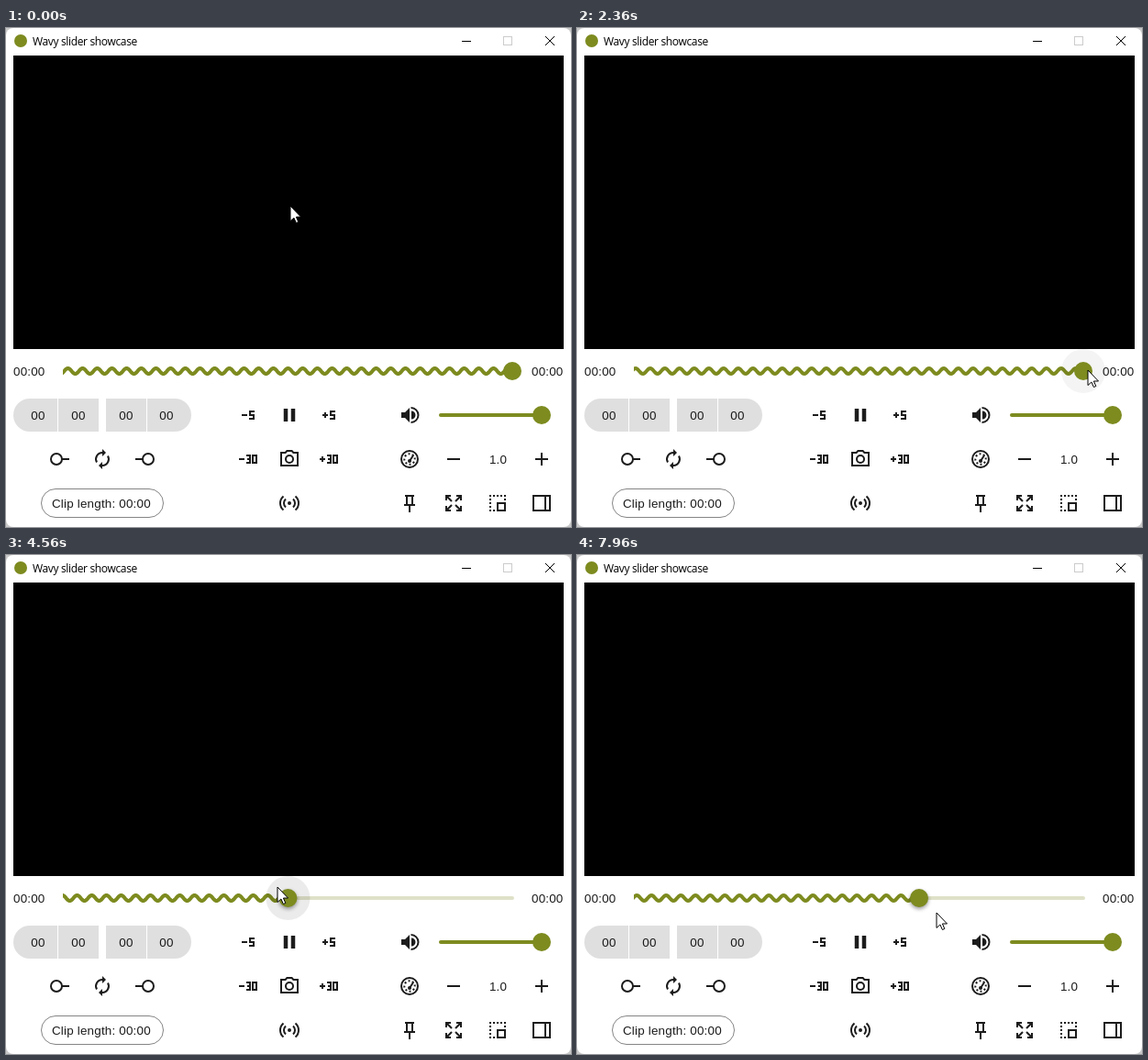
These frames come from a looping animation (616 px wide and 544 px high, 8 s). An HTML page:

```html
<!DOCTYPE html>
<html lang="en">
<head>
<meta charset="utf-8">
<title>Wavy slider showcase</title>
<style>
  html, body { margin: 0; width: 100%; height: 100%; overflow: hidden; background: #c9c9c9; }
  svg { display: block; width: 616px; height: 544px; }
  text { font: 13.4px "Liberation Sans", Arial, sans-serif; letter-spacing: .2px; fill: #1c1c1c; }
  .title { font: 12px "Open Sans", "Noto Sans", sans-serif; letter-spacing: -.35px; fill: #000; }
  .mid { text-anchor: middle; }
  .line { fill: none; stroke: #1c1c1c; stroke-width: 2; }
  .solid { fill: #1c1c1c; stroke: none; }
  .olive { fill: #7d8b1f; }
  .track { fill: none; stroke: #7d8b1f; stroke-width: 4; stroke-linecap: round; }
</style>
</head>
<body>
<svg viewBox="0 0 616 544">
  <defs>
    <clipPath id="active"><rect id="activeRect" x="62" y="360" height="28"/></clipPath>
    <filter id="blur" x="-50%" y="-50%" width="200%" height="200%"><feGaussianBlur stdDeviation="2"/></filter>
    <path id="minus" d="M0 5H6"/>
    <path id="plus" d="M0 5H6M3 2V8"/>
    <path id="three" d="M0 1H4V9H0M1 5H4"/>
    <path id="five" d="M6 1H1V5H5V9H0"/>
    <path id="zero" d="M1 1H5V9H1Z"/>
    <g id="turn"><path d="M0 -7A7 7 0 0 0 -6 3.5"/><path class="solid" d="M0 -11L4 -7L0 -3Z"/></g>
    <path id="corner" d="M-8 -3V-8H-3M-8 -8L-2 -2"/>
    <path id="waves" d="M-6.5 -7.6A10 10 0 0 0 -6.5 7.6M-4 -4.5A6 6 0 0 0 -4 4.5"/>
  </defs>

  <rect width="616" height="544" rx="8" fill="#fff"/>
  <rect x="8" y="30" width="600" height="320"/>

  <!-- title bar -->
  <circle class="olive" cx="16" cy="14" r="7"/>
  <text class="title" x="29" y="19">Wavy slider showcase</text>
  <g fill="none" stroke="#000">
    <path d="M497 14.5H507"/>
    <rect x="542.5" y="9.5" width="9" height="9" stroke="#ccc"/>
    <path d="M588 9L598 19M598 9L588 19"/>
  </g>

  <!-- seek bar -->
  <text x="8" y="379">00:00</text>
  <text x="573" y="379">00:00</text>
  <path id="rest" class="track" style="stroke:#dfe1c8"/>
  <g clip-path="url(#active)"><path id="wave" class="track"/></g>
  <circle id="halo" cy="374" r="24"/>
  <circle id="shadow" cy="376" r="10" filter="url(#blur)" opacity=".4"/>
  <circle id="thumb" class="olive" cy="374" r="10"/>

  <!-- clip times -->
  <g fill="#dfdfdf">
    <path d="M56 404H26a18 18 0 0 0 0 36H56Z"/>
    <path d="M57 404H101V440H57ZM109 404H153V440H109Z"/>
    <path d="M154 404H184a18 18 0 0 1 0 36H154Z"/>
  </g>
  <g class="mid">
    <text x="35" y="427">00</text><text x="79" y="427">00</text>
    <text x="131" y="427">00</text><text x="175" y="427">00</text>
    <text x="536.5" y="475">1.0</text>
  </g>
  <rect x="38.5" y="502.5" width="133" height="31" rx="15.5" fill="none" stroke="#858585"/>
  <text x="50" y="523">Clip length: 00:00</text>

  <!-- skip buttons -->
  <g class="line">
    <use href="#minus" x="257" y="417"/><use href="#five" x="265" y="417"/>
    <use href="#plus" x="345" y="417"/><use href="#five" x="353" y="417"/>
    <use href="#minus" x="254" y="465"/><use href="#three" x="262" y="465"/><use href="#zero" x="268" y="465"/>
    <use href="#plus" x="342" y="465"/><use href="#three" x="350" y="465"/><use href="#zero" x="356" y="465"/>
  </g>

  <!-- volume -->
  <path class="track" d="M474 422H584"/>
  <circle class="olive" cx="584" cy="422" r="10"/>

  <!-- icons, each drawn around its own centre -->
  <g class="line">
    <g transform="translate(55 470)"><circle r="6"/><path d="M6 0H14"/></g>
    <g transform="translate(155 470)"><circle r="6"/><path d="M-6 0H-14"/></g>
    <g transform="translate(105 470)"><use href="#turn"/><use href="#turn" transform="rotate(180)"/></g>
    <path transform="translate(309 422)" stroke-width="4.5" d="M-4 -7V7M4 -7V7"/>
    <g transform="translate(309 470)">
      <path d="M-9 -7H-4.4L-2.6 -9H2.6L4.4 -7H9V7H-9Z"/><circle r="4"/>
    </g>
    <g transform="translate(309 518)">
      <circle class="solid" r="2"/><use href="#waves"/><use href="#waves" transform="scale(-1 1)"/>
    </g>
    <g transform="translate(440 422)">
      <path class="solid" d="M-9 -3H-5L0 -8V8L-5 3H-9ZM2 -4.5A4.5 4.5 0 0 1 2 4.5Z"/>
      <path d="M1.5 -8A8 8 0 0 1 1.5 8"/>
    </g>
    <g transform="translate(440 470)">
      <circle r="9"/>
      <circle r="5.7" pathLength="36" stroke-dasharray="2 2.5" stroke-dashoffset="-12"/>
      <circle class="solid" cy="2" r="2"/><path d="M0 2L4 -4"/>
    </g>
    <path transform="translate(488 470)" d="M-7 0H7"/>
    <path transform="translate(584 470)" d="M-7 0H7M0 -7V7"/>
    <path transform="translate(440 518)" d="M-5 -8H5M-3 -8V2M3 -8V2M-6 2H6M0 2V10"/>
    <g transform="translate(488 518)">
      <use href="#corner"/><use href="#corner" transform="rotate(90)"/>
      <use href="#corner" transform="rotate(180)"/><use href="#corner" transform="rotate(270)"/>
    </g>
    <g transform="translate(536 518)">
      <path d="M0 0H8V8H0Z"/>
      <path stroke-dasharray="2 2" d="M-9 -8H9M-8 -5V9M8 -5V-2M-5 8H-2"/>
    </g>
    <path transform="translate(584 518)" d="M-9 -8H9V8H-9ZM4 -8V8"/>
  </g>

  <path id="cursor" d="M1 1V17.5L4.9 14L7.4 19.5L9.8 18.5L7.4 13H12.5Z" fill="#fff" stroke="#000"/>
</svg>
<script>
const LOOP = 8000, FRAME = 40;
const WAVE_LENGTH = 16, WAVE_AMPLITUDE = 3, WAVE_SPEED = 25 / 3; // px, px, px per second
const FIRST_CREST = 67.5;
const MIN_X = 64, MAX_X = 552;
const GRAB = 2860, LAG = 60, GRAB_OFFSET = 2.4; // the thumb trails the pointer by LAG ms

// Pointer stops; ease is the power used on the way to the next stop.
const stops = [
  { t: 0, x: 309, y: 193, ease: 2.3 },
  { t: 2240, x: 556, y: 372 },
  { t: 3000, x: 556, y: 372 },
  { t: 4560, x: 295, y: 361, from: 3000 },
  { t: 5600, x: 164, y: 380 },
  { t: 6900, x: 31, y: 377 },
  { t: 7960, x: 391, y: 389 }
];

const clamp = (v, low, high) => Math.min(high, Math.max(low, v));
const ramp = (t, from, to) => clamp((t - from) / (to - from), 0, 1);

function pointerAt(t) {
  const i = Math.max(1, stops.findIndex(stop => stop.t >= t));
  const a = stops[i - 1], b = stops[i];
  const k = ramp(t, a.t, b.t) ** (a.ease || 1);
  return { x: a.x + (b.x - a.x) * k, y: a.y + (b.y - a.y) * k };
}

function thumbAt(t) {
  const { x } = pointerAt(Math.max(t - LAG, GRAB));
  return clamp(x + GRAB_OFFSET, MIN_X, MAX_X);
}

function haloAt(t) {
  const hover = ramp(t, 2180, 2300) - ramp(t, 5640, 5880);
  const press = ramp(t, GRAB, GRAB + 100) - ramp(t, 4860, 5040);
  return .045 * hover + .035 * press;
}

function wavePath(t, end) {
  const crest = FIRST_CREST - t / 1000 * WAVE_SPEED;
  const points = [];
  for (let x = MIN_X - 4; x <= end; x++) {
    const y = 374 - WAVE_AMPLITUDE * Math.cos((x - crest) / WAVE_LENGTH * 2 * Math.PI);
    points.push(x + ' ' + y.toFixed(2));
  }
  return 'M' + points.join('L');
}

const set = (id, name, value) => document.getElementById(id).setAttribute(name, value);

function draw(now) {
  const t = Math.floor(now % LOOP / FRAME) * FRAME;
  const pointer = pointerAt(t), thumb = thumbAt(t);

  set('cursor', 'transform', `translate(${Math.round(pointer.x)} ${Math.round(pointer.y)})`);
  set('wave', 'd', wavePath(t, thumb));
  set('activeRect', 'width', thumb - 62);
  set('rest', 'd', `M${thumb} 374H${MAX_X}`);
  for (const id of ['thumb', 'halo', 'shadow']) set(id, 'cx', thumb);
  set('halo', 'opacity', haloAt(t));
  set('shadow', 'visibility', t >= GRAB ? 'visible' : 'hidden');
}

const start = performance.now();
function tick() {
  draw(performance.now() - start);
  requestAnimationFrame(tick);
}
tick();
</script>
</body>
</html>
```
